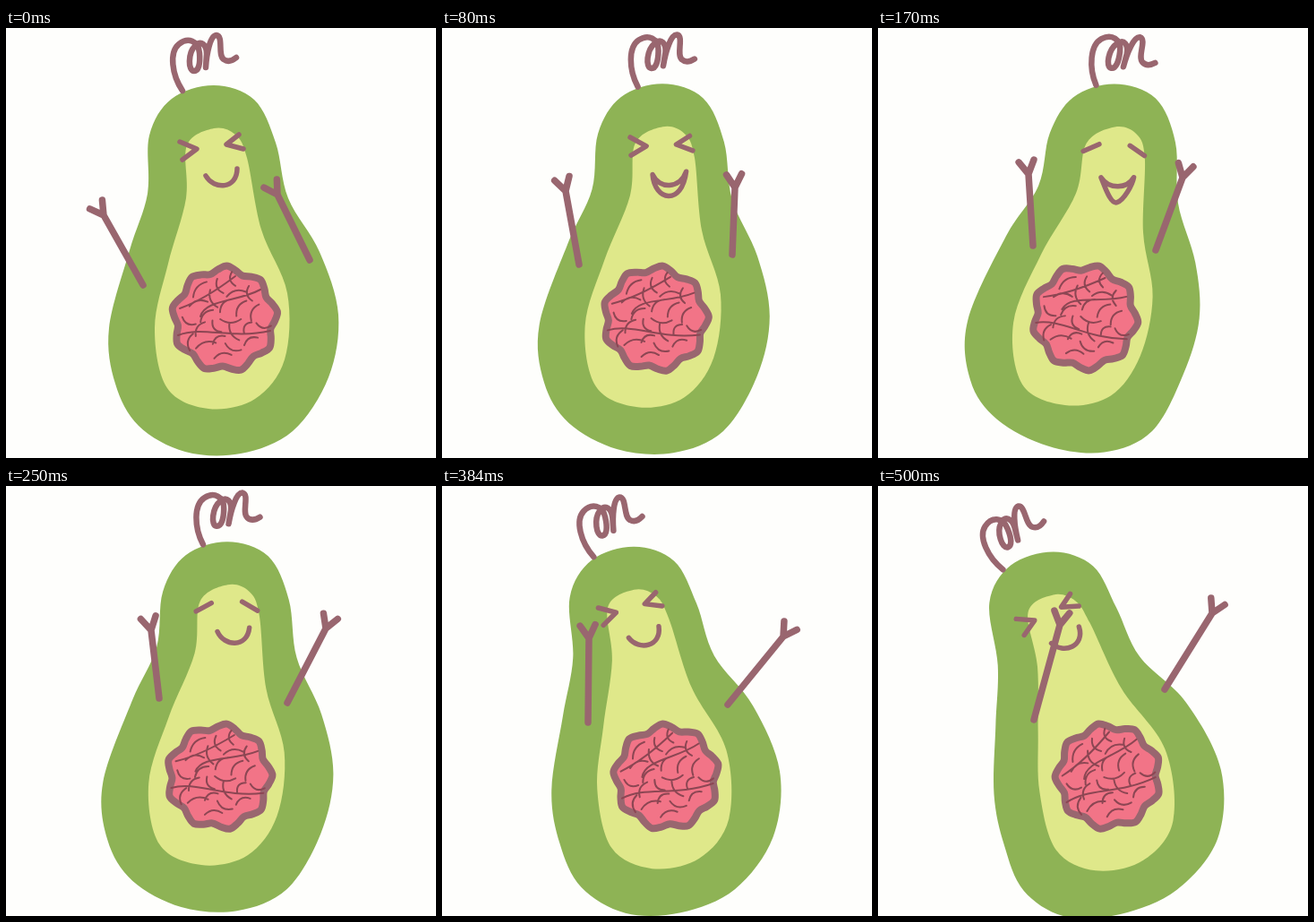
Write an HTML page that moves like this. It is 480 by 480 pixels and loops after 0.58 s.

```html
<!DOCTYPE html>
<html lang="en">
<head>
<meta charset="utf-8">
<title>Dancing avocado</title>
<style>
  html, body { margin: 0; width: 100%; height: 100%; overflow: hidden; background: #fefefc; }
  svg { display: block; width: 100%; height: 100%; }
  .line { fill: none; stroke: #99666f; stroke-linecap: round; stroke-linejoin: round; }
</style>
</head>
<body>
<svg viewBox="0 0 480 480">
  <path id="skin" fill="#8eb355"/>
  <path id="flesh" fill="#dfe88a"/>
  <g id="seed">
    <path id="shell" class="line" stroke-width="8" style="fill:#f27487"/>
    <path id="folds" fill="none" stroke="#8c4653" stroke-width="2" stroke-linecap="round"/>
  </g>
  <g id="head" class="line" stroke-width="5.5">
    <path id="stem" stroke-width="6.5" transform="translate(-33 -62)"
      d="M0 0C-12-18-15-43-4-52C6-60 18-56 19-42C20-30 18-22 13-22C6-22 6-42 14-50C21-57 27-51 27-41L26-26C27-42 31-62 38-62C46-61 39-40 46-35C50-32 55-33 60-37"/>
    <path id="eyes"/>
    <path id="mouth"/>
  </g>
  <path id="arms" class="line" stroke-width="7.5"/>
</svg>
<script>
const LOOP = 580;
const el = id => document.getElementById(id);
const setPath = (id, d) => el(id).setAttribute('d', d);

// Upright outlines; the lean bends them.
const SKIN = [[232,64], [185,79], [160,120], [158,185], [138,248], [115,335], [122,397], [148,444], [200,473],
  [262,475], [320,450], [360,390], [371,320], [350,250], [315,190], [301,128], [277,80]];
const FLESH = [[232,112], [202,131], [201,190], [181,263], [166,335], [180,402], [226,425],
  [278,414], [311,370], [314,296], [285,225], [269,145], [256,119]];

const EYES = {
  squeezed: 'M-36-5L-17 3L-33 15M30-13L16-2L35 3',
  closed: 'M-33 13L-17 2M17-3L35 5'
};
const MOUTHS = {
  smile: 'M-7 33C2 49 28 48 28 25',
  laugh: 'M-7 34C-2 63 29 66 30 27C25 47 2 50-7 34Z',
  shout: 'M-8 38C-3 45 8 66 15 62C22 58 28 40 28 31C23 45 4 50-8 38Z'
};

// Each arm runs from shoulder to wrist.
const POSES = [
  { at: 0, lean: 0, eyes: 'squeezed', mouth: 'smile', arms: [[153,287, 109,209], [339,259, 303,186]] },
  { at: 80, lean: .43, eyes: 'squeezed', mouth: 'laugh', arms: [[153,264, 138,182], [324,253, 327,178]] },
  { at: 170, lean: 1, eyes: 'closed', mouth: 'shout', arms: [[173,243, 168,163], [310,248, 340,167]] },
  { at: 250, lean: .46, eyes: 'closed', mouth: 'smile', arms: [[171,237, 162,161], [314,242, 357,159]] },
  { at: 330, lean: -.5, eyes: 'squeezed', mouth: 'smile', arms: [[163,264, 164,170], [319,244, 381,168]] },
  { at: 420, lean: -.76, eyes: 'squeezed', mouth: 'smile', arms: [[174,249, 210,146], [330,234, 389,162]] },
  { at: 500, lean: -1, eyes: 'squeezed', mouth: 'smile', arms: [[174,261, 203,155], [320,227, 373,142]] }
];

// The head swings one way, the belly the other, and the shoulders tilt between them.
const bend = lean => ([x, y]) => {
  const wave = Math.cos(Math.PI * (y - 90) / 300);
  const top = (1 + wave) / 2;
  const tilt = .52 * top * (1 - top) * (x - 235);
  return [
    x + lean * (8 + 27 * wave) - 2 * lean * lean * top,
    y + lean * (tilt - 4 - 1.5 * top) + 4 * lean * lean * top
  ];
};

// Closed smooth curve through the points.
function smooth(points) {
  const n = points.length;
  const at = i => points[(i + n) % n];
  const handle = (i, side) => at(i).map((v, k) => v + side * (at(i + 1)[k] - at(i - 1)[k]) / 6);
  return `M${at(0)}` + points.map((_, i) => `C${handle(i, 1)} ${handle(i + 1, -1)} ${at(i + 1)}`).join('') + 'Z';
}

const polar = (x, y, r, a) => [x + r * Math.cos(a), y + r * Math.sin(a)];

function arm([sx, sy, wx, wy]) {
  const angle = Math.atan2(wy - sy, wx - sx);
  const finger = spread => polar(wx, wy, 17, angle + spread);
  return `M${sx} ${sy}L${wx} ${wy}M${finger(-.63)}L${wx} ${wy}L${finger(.42)}`;
}

function buildSeed() {
  const [cx, cy, lobes] = [244, 325, 9];
  const rim = Array.from({ length: lobes * 4 }, (_, i) =>
    polar(cx, cy, 56 + 3.5 * Math.cos(i * Math.PI / 2), (i / (lobes * 4)) * 2 * Math.PI - 1.53));
  setPath('shell', smooth(rim));

  let seed = 7;
  const random = () => (seed = seed * 16807 % 2147483647) / 2147483647;
  let d = 'M192 343C220 332 250 348 295 338M194 313Q222 303 256 277M217 322C222 303 258 306 284 292';
  for (let i = 0; i < 24; i++) {
    const [x, y] = polar(cx, cy, 9.5 * Math.sqrt(i + .5), i * 2.4);
    const turn = random() * Math.PI;
    const half = 7 + 5 * random();
    d += `M${polar(x, y, half, turn)}Q${polar(x, y, 8, turn + 1.57)} ${polar(x, y, -half, turn)}`;
  }
  setPath('folds', d);
}

function draw({ lean, eyes, mouth, arms }) {
  const sq = lean * lean;
  setPath('skin', smooth(SKIN.map(bend(lean))));
  setPath('flesh', smooth(FLESH.map(bend(lean))));
  el('head').setAttribute('transform',
    `translate(${230 + 37 * lean - 3 * sq} ${132 - 5.5 * lean + 4.5 * sq}) rotate(${14.5 * lean - 3.5 * sq})`);
  el('seed').setAttribute('transform', `rotate(${13 * lean} 246 267)`);
  setPath('eyes', EYES[eyes]);
  setPath('mouth', MOUTHS[mouth]);
  setPath('arms', arms.map(arm).join(''));
}

const start = performance.now();
let shown;
function tick() {
  const t = (performance.now() - start) % LOOP;
  const pose = POSES.findLast(p => p.at <= t);
  if (pose !== shown) draw(shown = pose);
  requestAnimationFrame(tick);
}
buildSeed();
tick();
</script>
</body>
</html>
```
